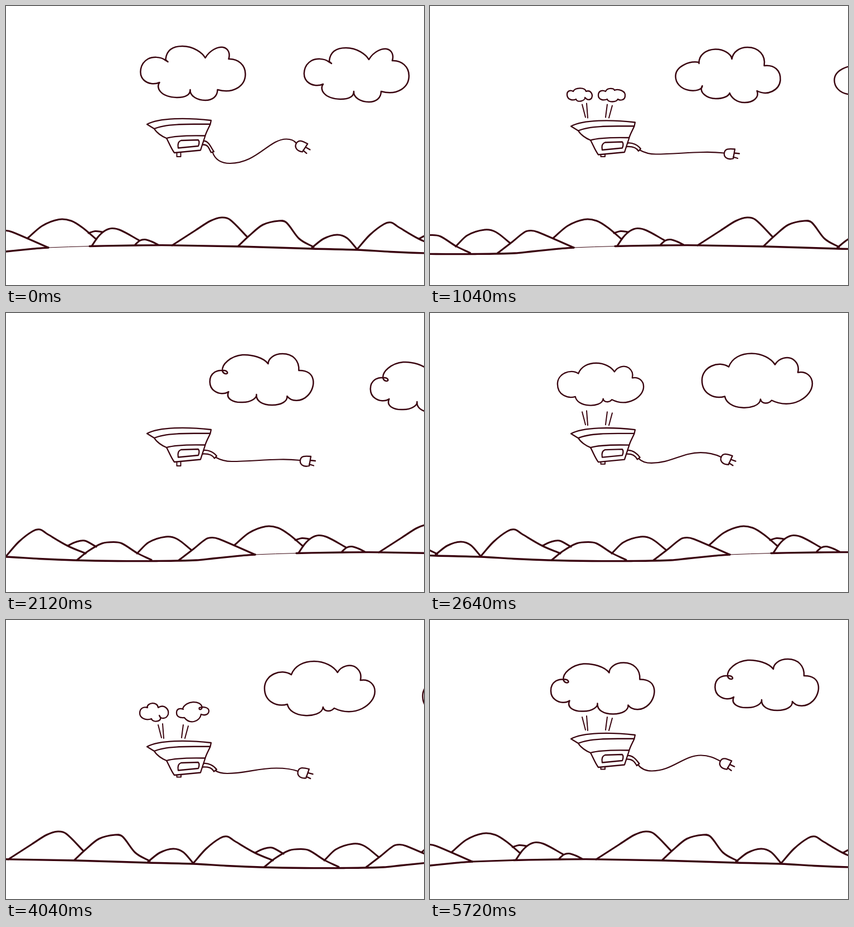
These frames come from a looping animation (750x500 px, 5.76 s). An HTML page with a canvas:

```html
<!DOCTYPE html>
<html lang="en">
<head>
<meta charset="utf-8">
<title>Flying iron</title>
<style>
html, body { margin: 0; width: 100%; height: 100%; overflow: hidden; background: #fff; }
canvas { display: block; }
</style>
</head>
<body>
<canvas id="stage" width="750" height="500"></canvas>
<script>
const ctx = document.getElementById('stage').getContext('2d');
const FRAME = 40, FRAMES = 144, TILE = 1001, SPEED = 7;
const INK = '#3a0510';

// ---------- helpers ----------
function line(path, width = 2.3) {
  ctx.lineWidth = width;
  ctx.stroke(typeof path === 'string' ? new Path2D(path) : path);
}

function place(x, y, draw, turn = 0, size = 1) {
  ctx.save();
  ctx.translate(x, y);
  ctx.rotate(turn);
  ctx.scale(size, size);
  draw();
  ctx.restore();
}

// smooth curve through [x, y, x, y, ...]
function curve(pts) {
  const n = pts.length / 2;
  const at = i => {
    const j = Math.max(0, Math.min(n - 1, i));
    return [pts[2 * j], pts[2 * j + 1]];
  };
  const p = new Path2D();
  p.moveTo(...at(0));
  for (let i = 0; i < n - 1; i++) {
    const [a, b, c, d] = [at(i - 1), at(i), at(i + 1), at(i + 2)];
    const k = (c[0] - b[0]) / 3;
    const m1 = (c[1] - a[1]) / (c[0] - a[0]);
    const m2 = (d[1] - b[1]) / (d[0] - b[0]);
    p.bezierCurveTo(b[0] + k, b[1] + k * m1, c[0] - k, c[1] - k * m2, c[0], c[1]);
  }
  return p;
}

function linear(keys, x) {
  let i = 0;
  while (i < keys.length - 2 && x > keys[i + 1][0]) i++;
  const [x0, y0] = keys[i], [x1, y1] = keys[i + 1];
  return y0 + (y1 - y0) * (x - x0) / (x1 - x0);
}

// ---------- landscape ----------
const hills = [
  [39, 416, 65, 394, 95, 382.5, 117, 385, 137, 397, 162, 418],
  [148, 407, 160, 403.5, 173, 405],
  [154, 430, 165, 414, 177, 403, 190, 398.5, 206, 402, 239, 420],
  [232, 427.5, 240, 420.5, 249, 418.5, 261, 422, 273, 428],
  [298, 429, 340, 402, 367, 385, 387, 379, 402, 383, 433, 414],
  [417, 430, 436, 412, 461, 392, 490, 385, 503, 388, 526, 417, 552, 432],
  [549, 433, 570, 417, 594, 410, 612, 416, 630, 436],
  [630, 436, 653, 410, 678, 391, 691, 388, 704, 396, 740, 417, 773, 431],
  [741, 417, 755, 410.5, 771, 408, 792, 419],
  [757, 443, 777, 427, 802, 413, 823, 410.5, 838, 413, 865, 430, 891, 442.5],
  [865, 431, 886, 411, 917, 401, 937, 405, 963, 425],
  [940, 443, 965, 424, 989, 405, 1000, 402.5, 1012, 405, 1077, 433]
].map(curve);
const ground = curve([150, 430.5, 233, 429, 300, 428.8, 420, 431, 550, 435, 630, 437,
  690, 440.5, 751, 443, 830, 444.5, 900, 444.5, 971, 443, 1001, 440, 1049, 435.2, 1077, 433]);

function drawLand(frame) {
  for (let k = -2; k <= 0; k++) {
    place(frame * SPEED + k * TILE, 0, () => {
      hills.forEach(h => line(h, 3.1));
      line(ground, 3.3);
      line('M76,433 Q112,431.5 150,430.5', k ? 3 : 1);
    });
  }
}

// ---------- clouds: left edge at x = 0 after shifting ----------
const clouds = {
  A: [241, 'M290,100C288,98 286,98 286,95C288,78 300,72 316,72C336,72 352,84 357,93C366,78 380,73 389,74C399,76 402,86 399,95C416,94 429,106 429,122C429,143 408,158 379,150C379,162 370,169 357,169C344,169 329,162 330,150C330,160 320,164 306,164C276,163 268,146 275,137C266,141 254,140 246,132C237,122 240,103 254,95C262,91 276,90 285,97L290,100'],
  B: [365, 'M470,91C462,80 440,74 424,75C403,77 386,92 388,104C390,110 397,110 397,107C396,101 381,102 374,106C362,114 363,133 374,140C381,145 392,146 399,141C393,154 408,161 424,160C440,160 450,152 449,146C448,158 460,165 477,165C494,165 505,158 504,149C512,160 530,159 541,148C556,133 557,102 525,103C526,85 514,73 496,73C480,73 470,82 470,91'],
  C: [439, 'M483,103C482,88 496,78 512,77.5C527,77 541,86 542,95C544,82 556,74 570,74C590,74 603,88 600,107C618,105 630,115 629,133C627,151 606,162 587,152C592,164 580,173 565,173C550,173 541,164 538,156C536,162 526,166 513,166C498,166 482,155 489,143C489,150 477,153 465,151C449,148 441,137 441,126C441,108 466,98 483,101'],
  D: [463, 'M512,98C518,82 534,74 553,74C572,74 588,83 595,94C602,82 618,78 628,85C637,92 638,100 636,108C652,105 662,116 662,128C662,152 625,176 589,158C583,165 571,165 569,156C568,168 550,172 536,171C519,170 507,162 505,151C488,156 464,148 464,122C464,98 494,86 512,98']
};
const looks = 'ACCDDB';
const drift = [[-1, 3.5], [0, 0], [9, 0], [11, -3], [12, 3], [14, 6], [17, 13], [20, 7], [21, 14], [23, 14]];

function drawCloud(step) {
  const [left, path] = clouds[looks[(step + 12) % 6]];
  const x = 241.5 + 25 * step - 0.045 * step * step;
  place(x - left, linear(drift, step), () => line(path, 2.5));
}

// ---------- steam ----------
const smallPuffs = 'M257,153C260,146 278,145 280,153C288,150 293,158 290,165C287,169 282,169 278,164C279,170 264,174 262,167C256,170 247,168 246,160C245,152 252,150 257,153' +
  'M315,153C318,146 330,147 331,151C338,148 352,152 350,162C349,169 341,170 337,167C334,173 320,173 318,167C311,170 302,168 302,160C302,152 309,150 315,153';
const bigPuffs = 'M253,157C254,147 272,146 273,157C284,150 293,160 291,169C288,178 277,178 275,171C284,182 263,185 261,177C250,181 240,175 240,167C240,158 247,155 254,157' +
  'M317,159C322,144 350,143 352,157C350,162 345,161 347,157C356,155 364,157 364,163C364,169 357,172 350,169C348,182 330,188 320,175C310,176 306,172 306,166C306,160 311,157 318,160';

function drawSteam(phase, drop) {
  if (phase < 7) return;
  place(0, drop, () => line(phase === 7
    ? 'M276,184L279,196M282,184L283,197M317,184L315,196M325,185L321,197'
    : 'M273,173L279,196M281,171L283,197M318,173L315,196M327,175L321,197', 2));
  if (phase === 8) line(smallPuffs);
  if (phase === 9) line(bigPuffs);
  if (phase === 10) {
    const [left, path] = clouds.D;
    place(228, 128, () => place(-left, -123, () => line(path, 3)), 0, 0.78);
  }
}

// ---------- iron ----------
const bob = [[-19, 10], [-1, 1], [0, 0], [26, 3.5], [53, 4], [78, 5.5], [101, 15], [125, 10], [143, 1], [144, 0]];

function bobAt(f) {
  let i = 2;
  while (f >= bob[i + 1][0]) i++;
  const [a, b, c, d] = [bob[i - 1], bob[i], bob[i + 1], bob[i + 2] || [170, 3.5]];
  const w = c[0] - b[0], u = (f - b[0]) / w;
  const m1 = (c[1] - a[1]) / (c[0] - a[0]) * w;
  const m2 = (d[1] - b[1]) / (d[0] - b[0]) * w;
  const u2 = u * u, u3 = u2 * u;
  return (2 * u3 - 3 * u2 + 1) * b[1] + (u3 - 2 * u2 + u) * m1 + (3 * u2 - 2 * u3) * c[1] + (u3 - u2) * m2;
}

// sleeve end (2 points), cord controls, plug angle
const cords = [
  [373, 261, 368, 262.5, 375, 275, 386, 282, 402, 282, 450, 282, 472, 238.5, 503, 238.5, 512, 238.5, 518, 242, 521, 246, 23],
  [375.5, 256.5, 371, 260, 379, 266, 387, 269.5, 398, 269.5, 435, 269.5, 455, 241.5, 486, 241.5, 500, 241.5, 510, 246, 521, 252, 19],
  [378, 253, 373, 256.5, 380, 258, 388, 260, 397, 260, 430, 260, 450, 250.5, 485, 250.5, 500, 250.5, 513, 252, 524, 256, 9],
  [378, 252.5, 374, 256.5, 384, 259, 392, 262, 405, 262, 435, 262, 460, 259, 490, 258.5, 505, 258, 518, 259, 528, 260, 0]
];
const swing = [0, 0, 1, 1.5, 2, 3, 3.3, 3.3, 3, 2, 1.5, 1];

function drawCord(phase) {
  const p = swing[phase], i = Math.min(2, Math.floor(p));
  const v = cords[i].map((a, k) => a + (cords[i + 1][k] - a) * (p - i));
  const [ax, ay, bx, by] = v;
  line(`M355,242C363,241 ${ax - 5},${ay - 7} ${ax},${ay}L${bx},${by}C${bx - 4},${by - 7} 363,248 353,248.5`);
  line(`M${(ax + bx) / 2},${(ay + by) / 2}C${v.slice(4, 10)}C${v.slice(10, 16)}C${v.slice(16, 22)}`, 2.2);
  place(v[20], v[21], () =>
    line('M19,-7L16,10C4,13 -1,6 0,0C1,-8 8,-8 19,-7M18,0L27,1M16,7L24,9.5'), v[22] * Math.PI / 180);
}

function drawIron(phase, drop) {
  place(0, drop, () => {
    line('M266,220L253,212C275,200 325,200 368,205L366.5,212C363,220 359,226 357,234L349,258.5L302,263C296,255 293,246 288,237C280,234 270,227 266,220C285,211.5 320,211.5 366,211.5');
    line('M288,237C305,232 335,232 357,232.5');
    line('M314,241C308,243 308,249 309,254.5L345,251C347,247 347,242 345,240Z');
    line(phase > 6 ? 'M306.5,263V266.5H314V262.5' : 'M306.5,263V270H313.5V262.5', 2);
    drawCord(phase);
  });
}

// ---------- loop ----------
function draw() {
  const frame = Math.floor(performance.now() / FRAME) % FRAMES;
  const phase = Math.floor(frame / 3) % 12;
  const drop = bobAt(frame);
  ctx.fillStyle = '#fff';
  ctx.fillRect(0, 0, 750, 500);
  ctx.strokeStyle = INK;
  ctx.lineCap = ctx.lineJoin = 'round';
  drawLand(frame);
  if (phase === 11) drawCloud(-1);
  drawCloud(phase);
  if (phase < 11) drawCloud(phase + 12);
  drawSteam(phase, drop);
  drawIron(phase, drop);
  requestAnimationFrame(draw);
}
draw();
</script>
</body>
</html>
```
